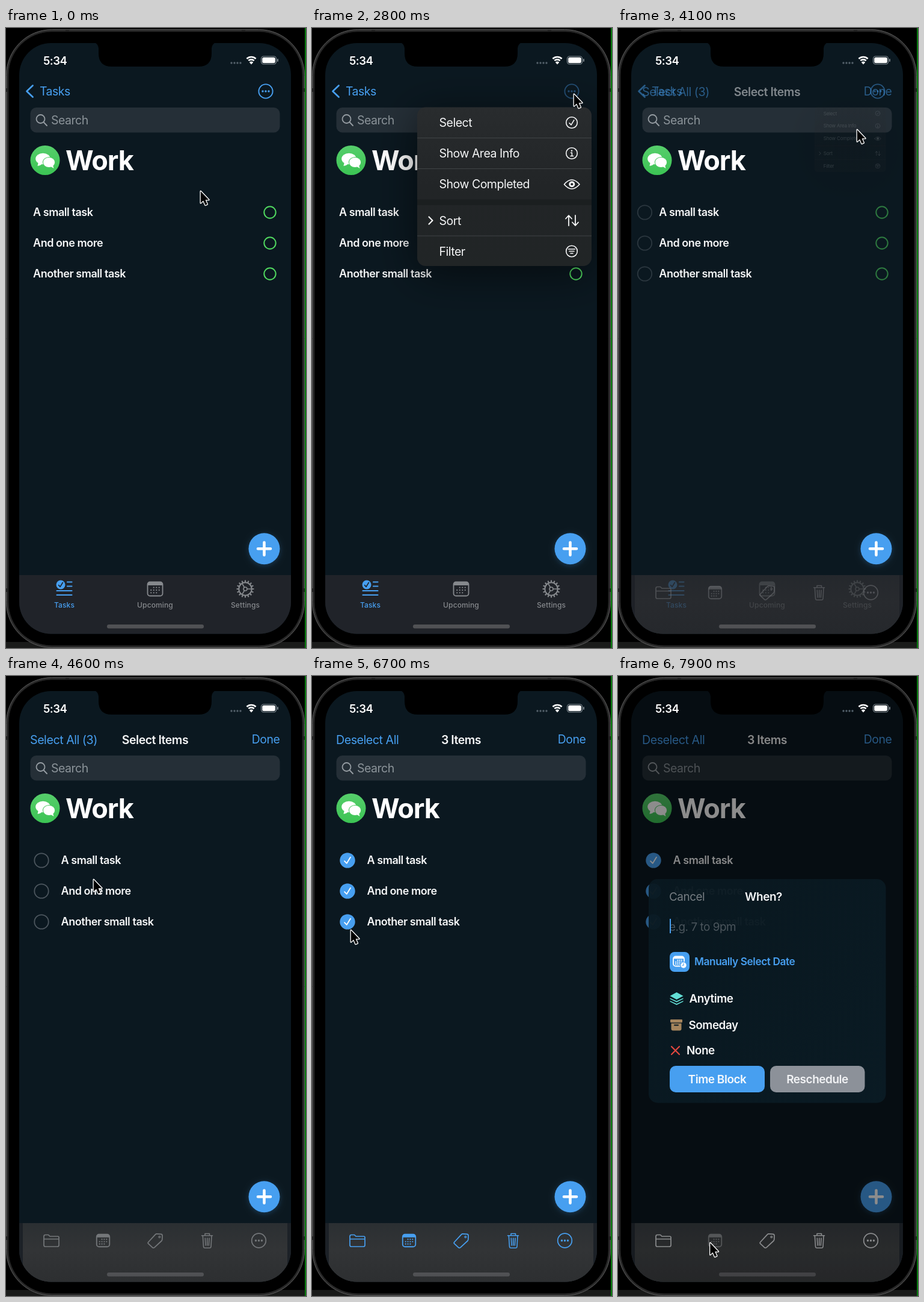
These frames come from a looping animation (499x1029 px, 8000 ms). An HTML page with a canvas:

```html
<!DOCTYPE html>
<html lang="en">
<head>
<meta charset="utf-8">
<title>Task selection</title>
<style>
html, body { margin: 0; width: 100%; height: 100%; overflow: hidden; background: #000; }
canvas { display: block; width: 499px; height: 1029px; }
</style>
</head>
<body>
<canvas id="stage"></canvas>
<script>
const W = 499, H = 1029, LOOP = 8000, STEP = 100;
const BLUE = '#479ff0', GREEN = '#50d95f', WHITE = '#f5f6f7', GRAY = '#86898d';
const canvas = document.getElementById('stage');
const ctx = canvas.getContext('2d');
const dpr = window.devicePixelRatio || 1;
canvas.width = W * dpr;
canvas.height = H * dpr;

const clamp = v => Math.max(0, Math.min(1, v));
const ramp = (t, from, to) => clamp((t - from) / (to - from));
const ease = p => p * p * (3 - 2 * p);
const mix = (a, b, p) => a + (b - a) * p;

// Pointer track: time, x, y
const pointerKeys = [
  [0, 323, 270], [800, 436, 99], [1000, 437, 103], [1300, 435, 109], [2900, 435, 109],
  [3300, 407, 160], [3400, 396, 172], [3600, 395, 173], [3700, 397, 168],
  [4100, 397, 168], [4600, 145, 337], [5000, 62, 304], [5200, 60, 306],
  [5400, 60.5, 346], [5900, 60, 350], [6200, 60, 397], [6500, 60, 395],
  [6700, 64, 421], [7500, 152.5, 940], [LOOP, 152.5, 940]
];

const rows = [
  { label: 'A small task', y: 306, pick: 5100 },
  { label: 'And one more', y: 357, pick: 5700 },
  { label: 'Another small task', y: 408, pick: 6300 }
];

function pointerAt(t) {
  const i = pointerKeys.findIndex(k => k[0] > t);
  const [t0, x0, y0] = pointerKeys[i - 1], [t1, x1, y1] = pointerKeys[i];
  const p = ease(ramp(t, t0, t1));
  return [mix(x0, x1, p), mix(y0, y1, p)];
}

function text(str, x, cy, size, weight, color, align = 'left', spacing = -0.025) {
  ctx.font = `${weight} ${size}px Inter, Roboto, sans-serif`;
  ctx.letterSpacing = spacing * size + 'px';
  ctx.textAlign = align;
  ctx.fillStyle = color;
  ctx.fillText(str, x, cy + size * 0.36);
}

function box(x, y, w, h, r, fill, stroke, lw = 1) {
  ctx.beginPath();
  ctx.roundRect(x, y, w, h, r);
  if (fill) { ctx.fillStyle = fill; ctx.fill(); }
  if (stroke) { ctx.strokeStyle = stroke; ctx.lineWidth = lw; ctx.stroke(); }
}

function disc(x, y, r, fill) {
  ctx.beginPath();
  ctx.arc(x, y, r, 0, 7);
  ctx.fillStyle = fill;
  ctx.fill();
}

function ring(x, y, r, color, lw) {
  ctx.beginPath();
  ctx.arc(x, y, r, 0, 7);
  ctx.strokeStyle = color;
  ctx.lineWidth = lw;
  ctx.stroke();
}

function line(d, color, lw) {
  ctx.strokeStyle = color;
  ctx.lineWidth = lw;
  ctx.lineCap = ctx.lineJoin = 'round';
  ctx.stroke(new Path2D(d));
}

function shape(d, fill) {
  ctx.fillStyle = fill;
  ctx.fill(new Path2D(d));
}

function layer(alpha, draw, x = 0, y = 0, scale = 1) {
  if (alpha <= 0) return;
  ctx.save();
  ctx.globalAlpha *= alpha;
  ctx.translate(x, y);
  ctx.scale(scale, scale);
  ctx.translate(-x, -y);
  draw();
  ctx.restore();
}

function ellipsis(x, y, r, color, lw) {
  ring(x, y, r, color, lw);
  for (const dx of [-5, 0, 5]) disc(x + dx, y, 1.7, color);
}

function check(x, y, color, s = 1, lw = 1.8) {
  line(`M${x - 4.5 * s} ${y + s}L${x - 1.2 * s} ${y + 4.5 * s}L${x + 4.5 * s} ${y - 4.8 * s}`, color, lw);
}

function calendar(x, y, w, h, color) {
  box(x - w / 2, y - h / 2, w, h, 4, null, color, 1.8);
  box(x - w / 2, y - h / 2, w, h * 0.24, [4, 4, 0, 0], color);
  for (let r = 0; r < 3; r++)
    for (let c = 0; c < 4; c++)
      if (!(r === 0 && c === 0) && !(r === 2 && c === 3))
        disc(x + (c - 1.5) * w * 0.18, y + (r - 0.55) * h * 0.19, 1.1, color);
}

function drawPhone() {
  ctx.fillStyle = '#000';
  ctx.fillRect(0, 0, W, H);
  ctx.fillStyle = '#1a1b1a';
  ctx.fillRect(0, 1019, W, 10);
  box(0.5, 2.5, 496, 1026, 76, '#2b2b2b', '#5c5c5c');
  box(4, 6, 489, 1019, 72, '#000', '#1c1c1c');
  ctx.fillStyle = '#202020';
  for (const y of [100, 930]) {
    ctx.fillRect(0, y, 4, 6);
    ctx.fillRect(493, y, 4, 6);
  }
  for (const x of [99, 392]) ctx.fillRect(x, 3, 6, 3);
  ctx.fillStyle = '#067a0c';
  ctx.fillRect(497, 0, 2, H);
}

function drawNotch() {
  shape('M146 24Q153 25 154 34V42Q154 64 176 64H320Q342 64 342 42V34Q343 25 350 24Z', '#000');
}

function drawStatus() {
  text('5:34', 62, 54, 18.5, 600, '#fff');
  for (let i = 0; i < 4; i++) disc(375 + i * 5, 58, 1.7, '#53606a');
  ctx.strokeStyle = '#fff';
  ctx.lineCap = 'butt';
  ctx.lineWidth = 2.7;
  for (const r of [6.7, 11]) {
    ctx.beginPath();
    ctx.arc(408, 59, r, -2.33, -0.81);
    ctx.stroke();
  }
  shape('M408 60.5L404.8 57Q408 54.2 411.2 57Z', '#fff');
  box(424.5, 47, 25, 13, 4, null, '#89939a', 1.1);
  box(426.2, 48.7, 21.6, 9.6, 2.5, '#fff');
  box(451, 51, 1.8, 5, 1, '#89939a');
}

function drawSearch() {
  box(40.5, 132, 415, 41.5, 10, '#252f37');
  ring(57.5, 151, 7, '#959ca2', 1.8);
  line('M62.8 156.5L68 162', '#959ca2', 1.9);
  text('Search', 75, 153, 19.5, 400, '#8c949a');
}

function drawHeading() {
  const g = ctx.createLinearGradient(0, 195, 0, 244);
  g.addColorStop(0, '#56ce6b');
  g.addColorStop(1, '#3cc454');
  disc(65, 219.5, 24.5, g);
  const bubble = (x, y, rx, ry, stroke) => {
    ctx.beginPath();
    ctx.ellipse(x, y, rx, ry, 0, 0, 7);
    ctx.fillStyle = '#fff';
    if (stroke) { ctx.strokeStyle = stroke; ctx.lineWidth = 2; ctx.stroke(); }
    ctx.fill();
  };
  shape('M54 222L52.5 229Q57 228.5 61 225Z', '#fff');
  bubble(61.5, 217, 12.3, 9.3);
  bubble(71.5, 223, 9.6, 8, '#49c95f');
  shape('M73 229L79.5 233L77.5 226Z', '#fff');
  text('Work', 99, 219.5, 45, 700, '#fff');
}

function drawRows(t, edit) {
  for (const { label, y, pick } of rows) {
    text(label, 45 + 46.5 * edit, y, 18, 600, WHITE);
    layer(1 - edit, () => ring(439, y, 9.7, GREEN, 2));
    layer(edit, () => {
      const x = mix(30, 59, edit);
      const p = ramp(t, pick - STEP, pick + STEP);
      ring(x, y, 11.7, '#4c565e', 1.8);
      layer(p, () => {
        disc(x, y, 12.6, BLUE);
        check(x, y, '#fff', 1.1, 1.8);
      });
    });
  }
}

function drawNav(t, edit, menu) {
  layer(1 - edit, () => {
    line('M44.5 95.5L34.5 105L44.5 114.5', BLUE, 2.7);
    text('Tasks', 56, 105, 19.4, 400, BLUE);
    layer(1 - 0.6 * menu, () => ellipsis(432, 105, 11.6, BLUE, 1.9));
  });
  layer(edit, () => {
    const n = rows.filter(r => t >= r.pick).length;
    const title = n === 0 ? 'Select Items' : n === 1 ? '1 Item' : n + ' Items';
    text(n === 3 ? 'Deselect All' : 'Select All (3)', 40, 105.5, 19.7, 400, BLUE);
    text(title, 248, 105.5, 19.5, 600, WHITE, 'center');
    text('Done', 455.3, 105.5, 19.4, 400, BLUE, 'right');
  });
}

function drawAddButton() {
  ctx.save();
  ctx.shadowColor = 'rgba(71,159,240,.25)';
  ctx.shadowBlur = 10 * dpr;
  ctx.shadowOffsetY = 2 * dpr;
  disc(429.5, 864.2, 26, BLUE);
  ctx.restore();
  line('M419 864.2H440M429.5 853.7V874.7', '#fff', 4.6);
}

function drawTabs() {
  ctx.fillStyle = '#202329';
  ctx.fillRect(22, 908, 452, 98);
  disc(91, 924, 7.5, BLUE);
  check(91, 924, '#202329', 0.75, 1.8);
  line('M102 919.5H109.5M102 926.5H109.5M84.5 934H109.5M84.5 941H109.5', BLUE, 2.1);
  calendar(248, 931, 25, 23, GRAY);
  ring(398, 931, 10.7, GRAY, 2);
  for (let i = 0; i < 16; i++) {
    const a = i * Math.PI / 8, c = Math.cos(a), s = Math.sin(a);
    line(`M${398 + c * 12} ${931 + s * 12}L${398 + c * 13.6} ${931 + s * 13.6}`, GRAY, 2.2);
  }
  ring(398, 931, 3, GRAY, 1.6);
  for (const a of [0, 2.094, 4.189])
    line(`M${398 + 3 * Math.cos(a)} ${931 + 3 * Math.sin(a)}L${398 + 10 * Math.cos(a)} ${931 + 10 * Math.sin(a)}`, GRAY, 1.7);
  const label = (s, x, color) => text(s, x, 957.3, 12, 500, color, 'center', 0.01);
  label('Tasks', 97, BLUE);
  label('Upcoming', 248, GRAY);
  label('Settings', 398, GRAY);
}

function drawToolbar(t) {
  ctx.fillStyle = '#1c2127';
  ctx.fillRect(22, 908, 452, 98);
  const g = ctx.createLinearGradient(0, 908, 0, 1005);
  g.addColorStop(0, '#2b2f32');
  g.addColorStop(0.45, '#323436');
  g.addColorStop(1, '#2d2f31');
  ctx.fillStyle = g;
  ctx.fillRect(28, 908, 440, 98);

  let outer = '#74777a', inner = '#74777a', day = '#74777a';
  if (t >= 5200) { outer = '#6597cf'; inner = day = '#c6d2f2'; }
  if (t >= 5600) outer = inner = day = BLUE;
  if (t >= 7700) { outer = inner = '#a8aaac'; day = '#66696b'; }

  line('M63 930Q63 927.5 65.5 927.5H70.5L73 930H86Q88 930 88 932V944.5Q88 947 85.5 947H65.5Q63 947 63 944.5ZM63 934.5H88', outer, 1.7);
  calendar(161.5, 937, 21.5, 20.5, day);
  line('M236.8 939.5L248.5 926.8Q249.5 925.7 251 925.8L258 926.4Q260 926.6 260 928.6L259.8 935Q259.7 936.5 258.8 937.5L247 948.3Q245 950 243.2 948.2L236.8 942.2Q235.5 940.9 236.8 939.5Z', inner, 1.7);
  ring(255.3, 931, 1.4, inner, 1.2);
  line('M325.5 928.8H343.5M331 928.5V925.5H338.5V928.5M327.3 929L328.5 947Q328.7 949.3 331 949.3H338.5Q340.8 949.3 341 947L342 929M331.3 933L332 945M334.7 933V945M338 933L337.3 945', inner, 1.6);
  ellipsis(420.5, 937, 11.8, outer, 1.7);
}

function drawMenu() {
  ctx.save();
  ctx.shadowColor = 'rgba(0,0,0,.55)';
  ctx.shadowBlur = 70 * dpr;
  ctx.shadowOffsetY = 12 * dpr;
  const g = ctx.createLinearGradient(0, 131, 0, 395);
  g.addColorStop(0, '#292c2e');
  g.addColorStop(0.5, '#222527');
  g.addColorStop(1, '#212526');
  box(175, 131.5, 290, 263.5, 14, g);
  ctx.restore();
  ctx.fillStyle = '#1b1f20';
  ctx.fillRect(175, 284.5, 290, 9.5);
  ctx.fillStyle = '#404446';
  for (const y of [182, 233, 344.5]) ctx.fillRect(175, y, 290, 1);
  [['Select', 157], ['Show Area Info', 208], ['Show Completed', 259], ['Sort', 319.5], ['Filter', 370.5]]
    .forEach(([s, y]) => text(s, 211.5, y, 19.5, 400, WHITE));
  line('M194.5 313.5L200.5 319.5L194.5 325.5', WHITE, 2.2);
  for (const y of [157, 208, 370.5]) ring(432, y, 9.3, WHITE, 1.6);
  check(432, 157, WHITE, 0.85, 1.6);
  disc(432, 203.7, 1.3, WHITE);
  line('M430.5 207H432.4V212.4M430 212.6H434.7', WHITE, 1.5);
  line('M419.5 259.5Q432 244.5 445 259.5Q432 274.5 419.5 259.5Z', WHITE, 1.7);
  disc(432.3, 259.3, 5, WHITE);
  disc(432.3, 259.3, 2, '#242729');
  line('M427 328V311.5M422 316.5L427 311.2L432 316.5M438 311V327.5M433 322.5L438 327.8L443 322.5', WHITE, 1.8);
  line('M426.5 367H437.5M428 370.5H436M430 374H434', WHITE, 1.6);
}

function drawDialog() {
  const g = ctx.createLinearGradient(51, 337, 445, 708);
  g.addColorStop(0, '#091820f2');
  g.addColorStop(1, '#0a1b24f6');
  box(51, 337, 394.5, 371.5, 15, g);
  text('Cancel', 85, 366, 18.9, 400, '#777e83');
  text('When?', 242, 366, 19, 600, WHITE, 'center');
  text('e.g. 7 to 9pm', 85, 416, 18.9, 400, '#4b555c');
  ctx.fillStyle = BLUE;
  ctx.fillRect(86, 403, 2, 24);

  box(86, 458, 33, 33, 8, BLUE);
  calendar(101, 473.5, 18, 16, '#fff');
  disc(109, 480, 6, BLUE);
  disc(109, 480, 4.7, '#fff');
  line('M109 477V480.3H106.8', BLUE, 1.1);
  text('Manually Select Date', 127, 474, 17.3, 600, BLUE);

  shape('M97.5 525L108.5 531L97.5 537L86.5 531Z', '#62ded5');
  for (const y of [534.5, 539]) shape(`M86.5 ${y}L97.5 ${y + 5}L108.5 ${y}V${y + 1.5}L97.5 ${y + 7}L86.5 ${y + 1.5}Z`, '#62ded5');
  text('Anytime', 118.5, 535, 18.9, 600, WHITE);

  box(87, 570, 20, 5.2, 1.3, '#a5855d');
  box(88.5, 576.5, 17, 12, [0, 0, 3, 3], '#a5855d');
  box(93, 578.5, 8, 2, 1, '#0a1b24');
  text('Someday', 117.5, 579, 18.9, 600, WHITE);

  line('M89 615L102 628M102 615L89 628', '#e2473f', 2.2);
  text('None', 114, 621.5, 18.9, 600, WHITE);

  box(86, 647, 158, 44, 10, BLUE);
  box(253, 647, 157.5, 44, 10, '#8c9199');
  text('Time Block', 165, 669, 19, 600, '#f4f8fc', 'center');
  text('Reschedule', 331.5, 669, 19, 600, '#f1f2f4', 'center');
}

function drawPointer(x, y) {
  ctx.save();
  ctx.translate(x + 0.8, y + 1);
  const d = 'M0 0V19.5L4.4 15.4L7.7 23L11 21.6L7.8 14.2H13.6Z';
  line(d, '#fff', 2.6);
  shape(d, '#000');
  ctx.restore();
}

function render(t) {
  const edit = ease(ramp(t, 3900, 4300));
  const menu = ease(ramp(t, 2400, 2800)) * (1 - ease(ramp(t, 3800, 4200)));
  const dialog = ease(ramp(t, 7500, 7900));

  ctx.setTransform(dpr, 0, 0, dpr, 0, 0);
  drawPhone();
  ctx.save();
  ctx.beginPath();
  ctx.roundRect(22, 25, 452, 980.5, 53);
  ctx.clip();
  ctx.fillStyle = '#0b1820';
  ctx.fillRect(22, 25, 452, 981);
  drawNav(t, edit, menu);
  drawSearch();
  drawHeading();
  drawRows(t, edit);
  drawAddButton();
  drawTabs();
  layer(edit, () => drawToolbar(t));
  box(168, 990, 161, 6.5, 3.2, '#505154');

  layer(dialog, () => {
    ctx.fillStyle = 'rgba(0,0,0,.45)';
    ctx.fillRect(22, 25, 452, 883);
    ctx.fillStyle = 'rgba(0,0,0,.18)';
    ctx.fillRect(22, 908, 452, 98);
  });
  layer(menu, drawMenu, 432, 131, mix(0.3, 1, menu));
  layer(dialog, drawDialog, 248, 523, mix(0.9, 1, dialog));
  drawNotch();
  drawStatus();
  ctx.restore();
  drawPointer(...pointerAt(t));
}

const start = performance.now();
function tick() {
  const t = (performance.now() - start) % LOOP;
  render(Math.floor(t / STEP) * STEP);
  requestAnimationFrame(tick);
}
tick();
</script>
</body>
</html>
```
